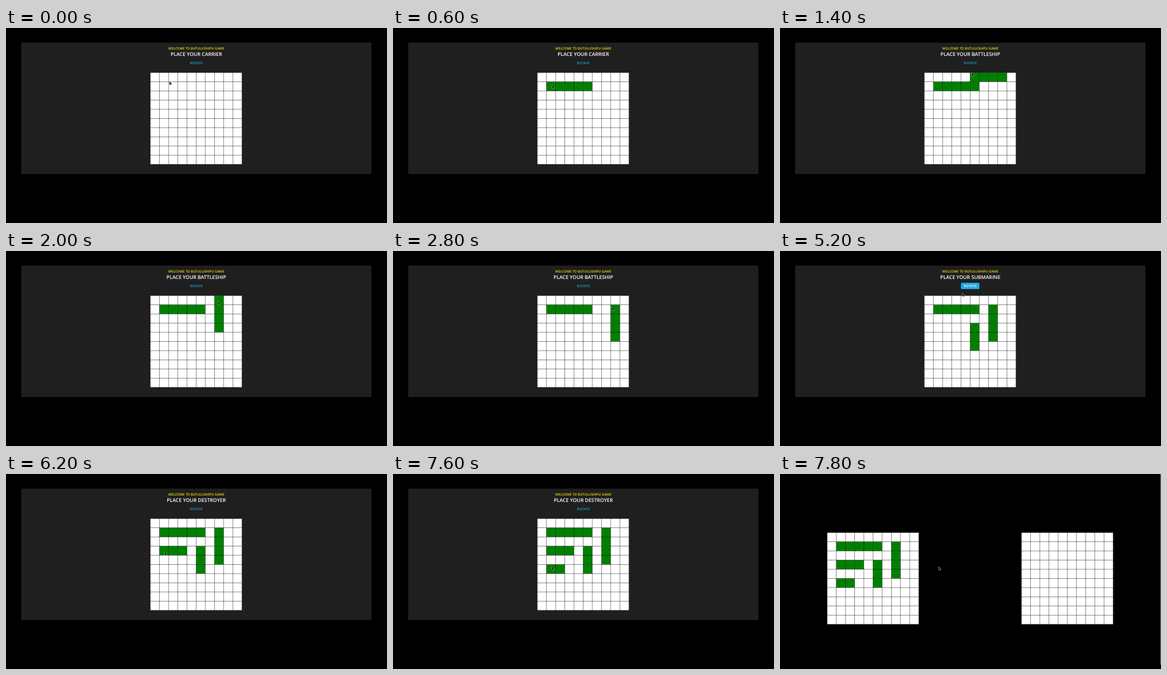
An HTML page with a canvas that plays this animation: 600 by 307 pixels, repeating every 8000 ms.

```html
<!DOCTYPE html>
<html lang="en">
<head>
<meta charset="utf-8">
<title>Place your ships</title>
<style>
  html, body { margin: 0; width: 100%; height: 100%; overflow: hidden; background: #000; }
  canvas { display: block; width: 100vw; height: 100vh; }
</style>
</head>
<body>
<canvas id="stage" width="600" height="307"></canvas>
<script>
const ctx = document.getElementById('stage').getContext('2d');
const LOOP = 8000, STEP = 200, BATTLE = 7800;
const CELL = 14.45, SIZE = CELL * 10;
const BOARD = { x: 227.2, y: 70.2 };
const BUTTON = { x: 285, y: 50, w: 29, h: 10 };
const BLUE = '#1fa8e6', GREEN = '#008000';

// Pointer moves: start, end, x, y; it rests in between
const home = { x: 257.5, y: 84.3 };
const moves = [
  [0, 600, 251, 90],
  [1200, 1400, 302, 70.4],
  [1400, 1600, 301, 54],
  [1600, 2200, 345, 88.5],
  [2800, 3200, 330, 87],
  [3200, 3800, 306.5, 125],
  [4200, 4600, 251, 131],
  [4600, 5000, 290, 56],
  [5000, 5200, 287.3, 66.5],
  [5200, 5800, 250, 120],
  [6000, 7000, 250, 146]
];
const rotations = [1600, 5000];

const ease = k => k * k * (3 - 2 * k);

function pointerAt(t) {
  let { x, y } = home;
  for (const [from, to, mx, my] of moves) {
    const k = ease(Math.min(1, Math.max(0, (t - from) / (to - from))));
    x += (mx - x) * k;
    y += (my - y) * k;
  }
  return { x, y };
}

// Cells a ship covers when its first cell is under the pointer
function cellsAt(len, t) {
  const p = pointerAt(t);
  const col = Math.floor((p.x - BOARD.x) / CELL);
  const row = Math.floor((p.y - BOARD.y) / CELL);
  const vert = rotations.filter(r => r <= t).length % 2;
  return Array.from({ length: len }, (_, i) =>
    vert ? [col, row + i] : [col + i, row]);
}

const ships = [
  ['CARRIER', 5, 1200], ['BATTLESHIP', 4, 3200], ['CRUISER', 3, 4200],
  ['SUBMARINE', 3, 6000], ['DESTROYER', 2, BATTLE]
].map(([name, len, click]) => ({ name, len, click, cells: cellsAt(len, click) }));

function preview(len, t, placed) {
  const taken = new Set(placed.map(String));
  const cells = cellsAt(len, t);
  const free = c => c.every(v => v >= 0 && v < 10) && !taken.has(String(c));
  return t > 0 && cells.every(free) ? cells : [];
}

function overButton(t) {
  const p = pointerAt(t), b = BUTTON;
  return p.x >= b.x && p.x <= b.x + b.w && p.y >= b.y && p.y <= b.y + b.h;
}

function box(x, y, w, h, color) {
  ctx.fillStyle = color;
  ctx.beginPath();
  ctx.roundRect(x, y, w, h, 1.5);
  ctx.fill();
}

function text(str, y, size, color, spacing = 0) {
  ctx.font = `600 ${size}px "Open Sans", "Noto Sans", sans-serif`;
  ctx.letterSpacing = spacing + 'px';
  ctx.textRendering = 'geometricPrecision';
  ctx.textAlign = 'center';
  ctx.fillStyle = color;
  ctx.fillText(str, 299.7 + spacing / 2, y);
}

function board(x, y, cells) {
  ctx.fillStyle = '#fff';
  ctx.fillRect(x, y, SIZE, SIZE);
  ctx.fillStyle = GREEN;
  for (const [col, row] of cells) {
    ctx.fillRect(x + col * CELL, y + row * CELL, CELL, CELL);
  }
  ctx.fillStyle = 'rgba(0,0,0,.55)';
  for (let d = 0; d < SIZE + 1; d += CELL) {
    ctx.fillRect(x + d - 0.4, y, 0.8, SIZE);
    ctx.fillRect(x, y + d - 0.4, SIZE, 0.8);
  }
}

function arrow({ x, y }) {
  const shape = [[0, 0], [0, 5], [1.2, 4], [2, 5.7], [2.7, 5.4], [2, 3.7], [3.5, 3.6]];
  ctx.beginPath();
  for (const [dx, dy] of shape) ctx.lineTo(x + dx, y + dy);
  ctx.closePath();
  ctx.lineWidth = 0.9;
  ctx.strokeStyle = '#ccc';
  ctx.stroke();
  ctx.fillStyle = '#111';
  ctx.fill();
}

function setup(t) {
  const done = ships.filter(s => s.click <= t);
  const ship = ships[done.length];
  const placed = done.flatMap(s => s.cells);
  // The highlight lingers one step after the pointer leaves
  const hot = overButton(t) || overButton(t - STEP);

  box(24, 23, 551.5, 207, '#1f1f1f');
  text('WELCOME TO BUTULUSHIPU GAME', 33.5, 5.25, '#f0e000');
  text('PLACE YOUR ' + ship.name, 43.5, 7.85, '#fff');
  if (hot) box(BUTTON.x, BUTTON.y, BUTTON.w, BUTTON.h, BLUE);
  text('ROTATE', 56.9, 5.25, hot ? '#fff' : BLUE, 0.3);
  board(BOARD.x, BOARD.y, placed.concat(preview(ship.len, t, placed)));
}

function battle() {
  board(74.2, 92.2, ships.flatMap(s => s.cells));
  board(380.2, 92.2, []);
  ctx.fillStyle = '#777';
  ctx.fillRect(599, 0, 1, 300);
}

function draw(now) {
  const t = Math.floor((now % LOOP) / STEP) * STEP;
  ctx.fillStyle = '#000';
  ctx.fillRect(0, 0, 600, 307);
  if (t < BATTLE) setup(t);
  else battle();
  arrow(pointerAt(t));
}

let start;
function tick(now) {
  start ??= now;
  draw(now - start);
  requestAnimationFrame(tick);
}
draw(0);
requestAnimationFrame(tick);
</script>
</body>
</html>
```
